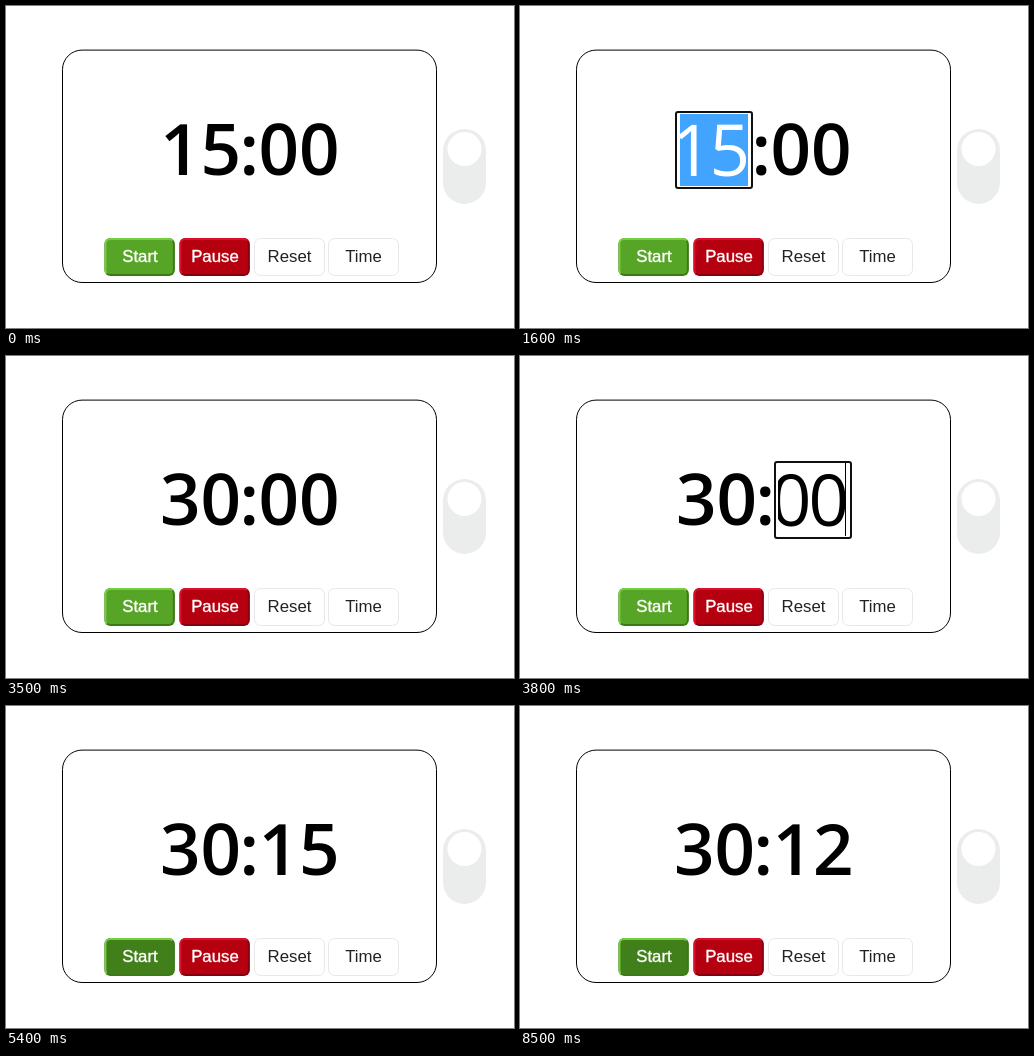
Write an HTML page with a canvas that moves like this. It is 508 by 322 pixels and loops after 9 s.

```html
<!DOCTYPE html>
<html lang="en">
<head>
<meta charset="utf-8">
<title>Countdown timer</title>
<style>
  html, body { margin: 0; width: 100%; height: 100%; overflow: hidden; background: #fff; }
  canvas { display: block; }
</style>
</head>
<body>
<canvas id="stage" width="508" height="322"></canvas>
<script>
const ctx = document.getElementById('stage').getContext('2d');
const LOOP = 9000;
const SIZE = 71;
const DIGIT_FONT = '"Open Sans", "Noto Sans", sans-serif';
const LABEL_FONT = '16.8px "Liberation Sans", Arial, sans-serif';

// Each step holds from its time on; a field being edited is "min" or "sec".
const STEPS = [
  { at: 0, min: '15', sec: '00' },
  { at: 1100, min: '15', sec: '00', edit: 'min', caret: true },
  { at: 1400, min: '15', sec: '00', edit: 'min', selected: true },
  { at: 2100, min: '3', sec: '00', edit: 'min', caret: true },
  { at: 2400, min: '30', sec: '00', edit: 'min', caret: true },
  { at: 2900, min: '30', sec: '00', edit: 'min' },
  { at: 3200, min: '30', sec: '00' },
  { at: 3700, min: '30', sec: '00', edit: 'sec', caret: true },
  { at: 4000, min: '30', sec: '00', edit: 'sec', selected: true },
  { at: 4400, min: '30', sec: '1', edit: 'sec', caret: true },
  { at: 4600, min: '30', sec: '15', edit: 'sec', caret: true },
  { at: 4900, min: '30', sec: '15' }
];
const HOVER_AT = 5200;
const RUN_AT = 5500;

function roundRect(x, y, w, h, r) {
  ctx.beginPath();
  ctx.roundRect(x, y, w, h, r);
}

function fillRound(x, y, w, h, r, color) {
  roundRect(x, y, w, h, r);
  ctx.fillStyle = color;
  ctx.fill();
}

function strokeRound(x, y, w, h, r, color, width) {
  roundRect(x, y, w, h, r);
  ctx.strokeStyle = color;
  ctx.lineWidth = width;
  ctx.stroke();
}

function label(text, x, color) {
  ctx.font = LABEL_FONT;
  ctx.textAlign = 'center';
  ctx.fillStyle = color;
  ctx.fillText(text, x, 256);
}

function raisedButton(text, x, face, light, dark) {
  const y = 232, w = 70.5, h = 38;
  fillRound(x, y, w, h, 6, dark);
  ctx.save();
  ctx.beginPath();
  ctx.moveTo(x, y + h);
  ctx.lineTo(x, y);
  ctx.lineTo(x + w, y);
  ctx.lineTo(x + w - 19, y + 19);
  ctx.lineTo(x + 19, y + 19);
  ctx.clip();
  fillRound(x, y, w, h, 6, light);
  ctx.restore();
  fillRound(x + 2, y + 2, w - 4, h - 4, 4, face);

  const center = x + w / 2 + 0.3;
  label(text, center, '#fff');
  ctx.strokeStyle = '#fff';
  ctx.lineWidth = 0.35;
  ctx.strokeText(text, center, 256);
}

function flatButton(text, x) {
  strokeRound(x + 0.5, 232.5, 70, 37, 6, '#e8e8e8', 1);
  label(text, x + 35.5, '#222');
}

function bigText(text, x, align = 'left') {
  ctx.font = `600 ${SIZE}px ${DIGIT_FONT}`;
  ctx.textAlign = align;
  ctx.fillStyle = '#000';
  ctx.fillText(text, x, 169);
}

function field(text, x, state) {
  strokeRound(x + 1, 106, 76, 76, 2, '#101010', 2);

  ctx.save();
  ctx.beginPath();
  ctx.rect(x + 4, 107, 69, 74);
  ctx.clip();
  if (state.selected) {
    ctx.fillStyle = '#43a4ff';
    ctx.fillRect(x + 5, 108, 68, 72);
  }

  ctx.font = `400 ${SIZE}px ${DIGIT_FONT}`;
  ctx.letterSpacing = '-3px';
  ctx.textAlign = 'left';
  ctx.fillStyle = state.selected ? '#fff' : '#000';
  const width = ctx.measureText(text).width;
  const left = Math.min(x + 4, x + 72 - width);
  ctx.fillText(text, left, 170);

  if (state.caret) ctx.fillRect(Math.min(Math.round(left + width), x + 71), 107, 1, 73);
  ctx.restore();
}

// The open field pushes the rest of the clock slightly aside.
function clock(s) {
  const shift = s.edit === 'min' ? -2 : s.edit === 'sec' ? 2 : 0;
  if (s.edit === 'min') field(s.min, 155, s);
  else bigText(s.min, 154 + shift);
  bigText(':', 243.3 + shift, 'center');
  if (s.edit === 'sec') field(s.sec, 254, s);
  else bigText(s.sec, 252.5 + shift);
}

function stateAt(t) {
  const s = { ...STEPS.findLast(step => step.at <= t) };
  if (t >= RUN_AT) s.sec = String(15 - Math.floor((t - RUN_AT) / 1000));
  return s;
}

function draw(t) {
  ctx.fillStyle = '#fff';
  ctx.fillRect(0, 0, 508, 322);

  strokeRound(56.5, 44.1, 374, 232.4, 19.5, '#000', 1);
  fillRound(437, 123, 43, 75, 21.5, '#ebedec');
  fillRound(441.5, 126, 34, 34, 17, '#fff');

  raisedButton('Start', 98.4, t >= HOVER_AT ? '#417f1a' : '#57a527', '#74d13c', '#3c7a17');
  raisedButton('Pause', 173.4, '#b5000f', '#dc0f2c', '#870010');
  flatButton('Reset', 248);
  flatButton('Time', 322);

  clock(stateAt(t));
}

const start = performance.now();
function tick() {
  draw((performance.now() - start) % LOOP);
  requestAnimationFrame(tick);
}
tick();
</script>
</body>
</html>
```
